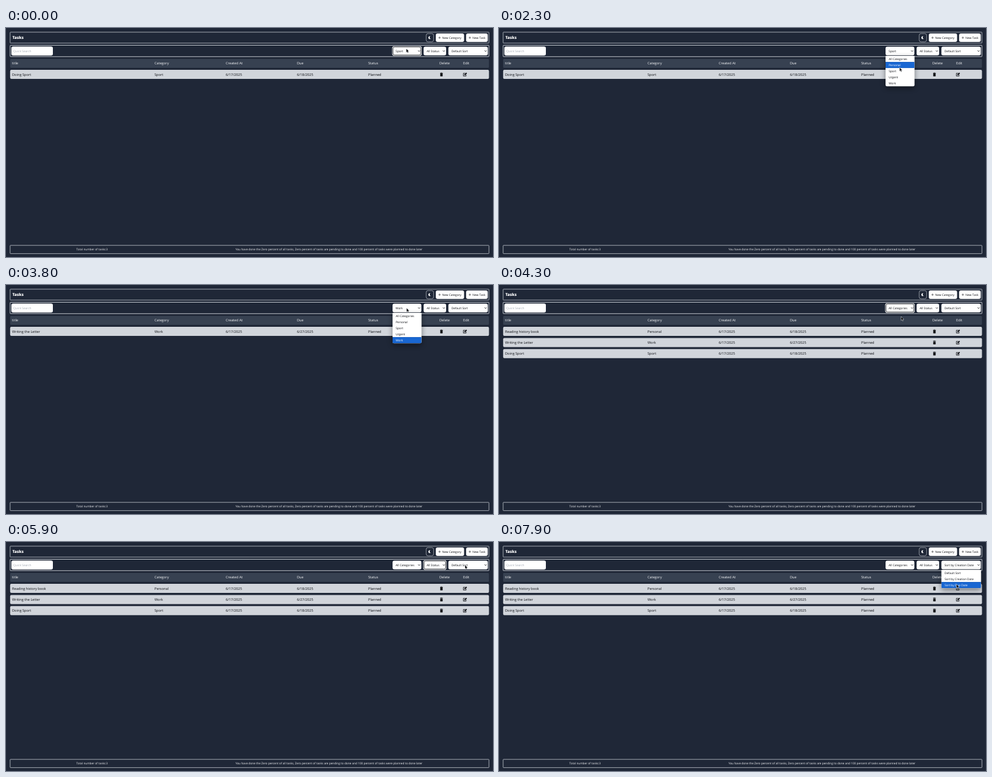
Write an HTML page with a canvas that moves like this. It is 800 px wide and 378 px high and loops after 8000 ms.

```html
<!DOCTYPE html>
<html lang="en">
<head>
<meta charset="utf-8">
<title>Tasks</title>
<style>
html, body { margin: 0; width: 100%; height: 100%; overflow: hidden; background: #1f2737; }
canvas { display: block; width: 800px; height: 378px; }
</style>
</head>
<body>
<canvas id="stage"></canvas>
<script>
const LOOP = 8000;
const FONT = '"Open Sans", "Noto Sans", sans-serif';
const BG = '#1f2737', INK = '#0b0d12', LIGHT = '#f5f6f8';
const COLS = [10, 244, 361, 478, 595];

const canvas = document.getElementById('stage');
const dpr = window.devicePixelRatio || 1;
canvas.width = 800 * dpr;
canvas.height = 378 * dpr;
const g = canvas.getContext('2d');
g.scale(dpr, dpr);
if ('textRendering' in g) g.textRendering = 'geometricPrecision';

const TASKS = [
  ['Reading history book', 'Personal', '6/17/2025', '6/18/2025', 'Planned'],
  ['Writing the Letter', 'Work', '6/17/2025', '6/27/2025', 'Planned'],
  ['Doing Sport', 'Sport', '6/17/2025', '6/18/2025', 'Planned']
];

const SELECTS = {
  category: { x: 635, w: 47.3, items: ['All Categories', 'Personal', 'Sport', 'Urgent', 'Work'] },
  status: { x: 686, w: 37, items: ['All Status'] },
  sort: { x: 726.7, w: 64.8, items: ['Default Sort', 'Sort by Creation Date', 'Sort by Due Date'] }
};

// Each step changes part of the state from its time on.
const STEPS = [
  [0, { category: 2, status: 0, sort: 0, focus: 'category', open: null }],
  [600, { open: 'category' }],
  [2700, { open: null, category: 4 }],
  [3600, { open: 'category' }],
  [4100, { open: null, category: 0 }],
  [4900, { focus: 'status' }],
  [6200, { focus: 'sort', open: 'sort' }],
  [6950, { open: null, sort: 1 }],
  [7450, { open: 'sort' }]
];

// Pointer tip: time, x, y
const PATH = [
  [0, 657.5, 34], [1300, 657.5, 34], [2300, 658, 65], [2650, 661, 88],
  [3200, 663, 89.5], [3550, 658, 36], [3800, 658, 38], [4100, 659, 49],
  [4300, 660.5, 52], [4800, 704, 36], [5400, 704, 36], [5900, 754, 38],
  [6400, 754, 38], [6850, 753, 58], [7050, 753, 58], [7380, 754, 37],
  [7500, 754, 37], [7850, 751.5, 69.5], [8000, 751.5, 69.5]
];

function stateAt(t) {
  return Object.assign({}, ...STEPS.filter(s => s[0] <= t).map(s => s[1]));
}

function pointerAt(t) {
  const i = Math.max(1, PATH.findIndex(p => p[0] > t));
  const [a, b] = [PATH[i - 1], PATH[i]];
  const k = (t - a[0]) / (b[0] - a[0]);
  const e = k * k * (3 - 2 * k);
  return { x: a[1] + (b[1] - a[1]) * e, y: a[2] + (b[2] - a[2]) * e };
}

function label(str, x, cy, size, color, weight = 400) {
  g.font = `${weight} ${size}px ${FONT}`;
  g.fillStyle = color;
  g.fillText(str, x, cy + size * 0.36);
}

function box(x, y, w, h, r, fill) {
  g.beginPath();
  g.roundRect(x, y, w, h, r);
  g.fillStyle = fill;
  g.fill();
}

function frame(x, y, w, h, r, color, width) {
  g.beginPath();
  g.roundRect(x, y, w, h, r);
  g.strokeStyle = color;
  g.lineWidth = width;
  g.stroke();
}

function shape(points, fill) {
  g.beginPath();
  points.forEach(([x, y]) => g.lineTo(x, y));
  g.closePath();
  g.fillStyle = fill;
  g.fill();
}

function line(points, color, width) {
  g.beginPath();
  points.forEach(([x, y]) => g.lineTo(x, y));
  g.strokeStyle = color;
  g.lineWidth = width;
  g.stroke();
}

function moon(x, y) {
  g.beginPath();
  g.arc(x, y, 2.3, -1.2, 0.9, true);
  g.quadraticCurveTo(x - 1.5, y + 0.6, x + 0.8, y - 2.15);
  g.fillStyle = '#fff';
  g.fill();
}

function button(x, w, str) {
  box(x, 9, w, 14, 3, '#fff');
  line([[x + 4.3, 16], [x + 8, 16]], INK, 0.55);
  line([[x + 6.15, 14.1], [x + 6.15, 17.9]], INK, 0.55);
  label(str, x + 10.5, 16, 4.85, INK, 500);
}

function trash(x, y) {
  box(x - 2.3, y - 2.7, 4.6, 0.9, 0.2, INK);
  box(x - 0.8, y - 3.1, 1.6, 0.6, 0.2, INK);
  box(x - 1.95, y - 1.5, 3.9, 4.6, 0.5, INK);
}

function pencil(x, y) {
  g.beginPath();
  g.moveTo(x + 0.3, y - 1.9);
  g.lineTo(x - 2.6, y - 1.9);
  g.lineTo(x - 2.6, y + 2.7);
  g.lineTo(x + 1.9, y + 2.7);
  g.lineTo(x + 1.9, y + 0.6);
  g.strokeStyle = INK;
  g.lineWidth = 0.85;
  g.stroke();
  shape([[x - 1.2, y + 1.5], [x - 0.9, y - 0.1], [x + 2, y - 3], [x + 3.4, y - 1.6], [x + 0.5, y + 1.2]], INK);
}

function drawHeader() {
  frame(6.8, 6.9, 786.5, 18, 0.5, '#b3b8c0', 0.9);
  label('Tasks', 10.4, 16, 6.5, '#fff', 800);
  frame(690.2, 9.2, 12.2, 13.6, 3, '#d5d9df', 0.6);
  moon(696.1, 16);
  button(706, 46.5, 'New Category');
  button(755.8, 35.6, 'New Task');
}

function drawSelect(key, s) {
  const { x, w, items } = SELECTS[key];
  if (s.focus === key && s.open !== key) {
    box(x - 0.6, 30, w + 1.2, 15.9, 3.4, '#fff');
    frame(x + 0.7, 31.2, w - 1.4, 13.5, 2.6, '#15181f', 0.9);
  } else {
    box(x, 30.7, w, 14.5, 3, '#fff');
  }
  label(items[s[key]], x + 5, 38, 4.85, INK, 500);
  const c = x + w - 3.7;
  line([[c - 1.6, 37.2], [c, 38.8], [c + 1.6, 37.2]], INK, 0.9);
}

function drawFilters(s) {
  frame(6.8, 28.5, 786.5, 18.8, 0.5, '#d3d7dd', 0.9);
  box(8.8, 30.4, 68.2, 15, 3, '#fff');
  label('Quick Search', 12, 38, 4.9, '#a3a9b4');
  Object.keys(SELECTS).forEach(key => drawSelect(key, s));
}

function drawTable(s) {
  box(6.8, 51, 786.6, 14.8, 1.5, '#374151');
  ['title', 'Category', 'Created At', 'Due', 'Status'].forEach((h, i) => label(h, COLS[i], 58.4, 5.65, LIGHT));
  label('Delete', 712, 58.4, 5.65, LIGHT);
  label('Edit', 751, 58.4, 5.65, LIGHT);

  const pick = SELECTS.category.items[s.category];
  TASKS.filter(task => !s.category || task[1] === pick).forEach((task, row) => {
    const cy = 76.6 + row * 18.3;
    box(6.8, cy - 7.5, 786.6, 15, 2, '#d1d5db');
    task.forEach((cell, i) => label(cell, COLS[i], cy, 5.65, INK));
    trash(715.3, cy);
    pencil(753.9, cy);
  });
}

function drawFooter() {
  frame(6.8, 358.8, 786.5, 13.6, 0.5, '#b3b8c0', 0.9);
  label('Total number of tasks:3', 115.6, 365.7, 4.72, LIGHT);
  label('You have done the Zero percent of all tasks, Zero percent of tasks are pending to done and 100 percent of tasks were planned to done later', 377, 365.7, 4.75, LIGHT);
}

function drawMenu(s, p) {
  if (!s.open) return;
  const { x, w, items } = SELECTS[s.open];
  const h = items.length * 10 + 0.4;
  const active = p.y >= 46 ? Math.min(items.length - 1, Math.floor((p.y - 46) / 10)) : s[s.open];
  g.save();
  g.shadowColor = 'rgba(0,0,0,.45)';
  g.shadowBlur = 9 * dpr;
  g.shadowOffsetY = 3 * dpr;
  box(x, 45.9, w + 0.3, h, [0.5, 0.5, 2.5, 2.5], '#fff');
  g.restore();

  g.save();
  g.beginPath();
  g.roundRect(x, 45.9, w + 0.3, h, [0.5, 0.5, 2.5, 2.5]);
  g.clip();
  const top = 46 + active * 10;
  box(x, top, w + 0.3, 10.1, 0, '#1967d2');
  g.setLineDash([0.9, 0.9]);
  frame(x + 0.3, top + 0.3, w - 0.3, 9.5, 0, '#0d3f8a', 0.5);
  g.restore();
  items.forEach((item, i) => label(item, x + 5.2, 51.1 + i * 10, 4.8, i === active ? '#fff' : INK));
}

function drawPointer({ x, y }) {
  const tip = [[0, 0], [0, 6.5], [1.5, 5.2], [2.5, 7.5], [3.6, 7], [2.6, 4.8], [4.6, 4.7]]
    .map(([dx, dy]) => [x + dx, y + dy]);
  shape(tip, '#050608');
  g.lineJoin = 'round';
  line([...tip, tip[0]], '#e8eaee', 0.5);
  g.lineJoin = 'miter';
}

function draw(now) {
  const t = now % LOOP;
  const s = stateAt(t), p = pointerAt(t);
  g.fillStyle = BG;
  g.fillRect(0, 0, 800, 378);
  drawHeader();
  drawFilters(s);
  drawTable(s);
  drawFooter();
  drawMenu(s, p);
  drawPointer(p);
}

const start = performance.now();
function tick() {
  draw(performance.now() - start);
  requestAnimationFrame(tick);
}
tick();
</script>
</body>
</html>
```
